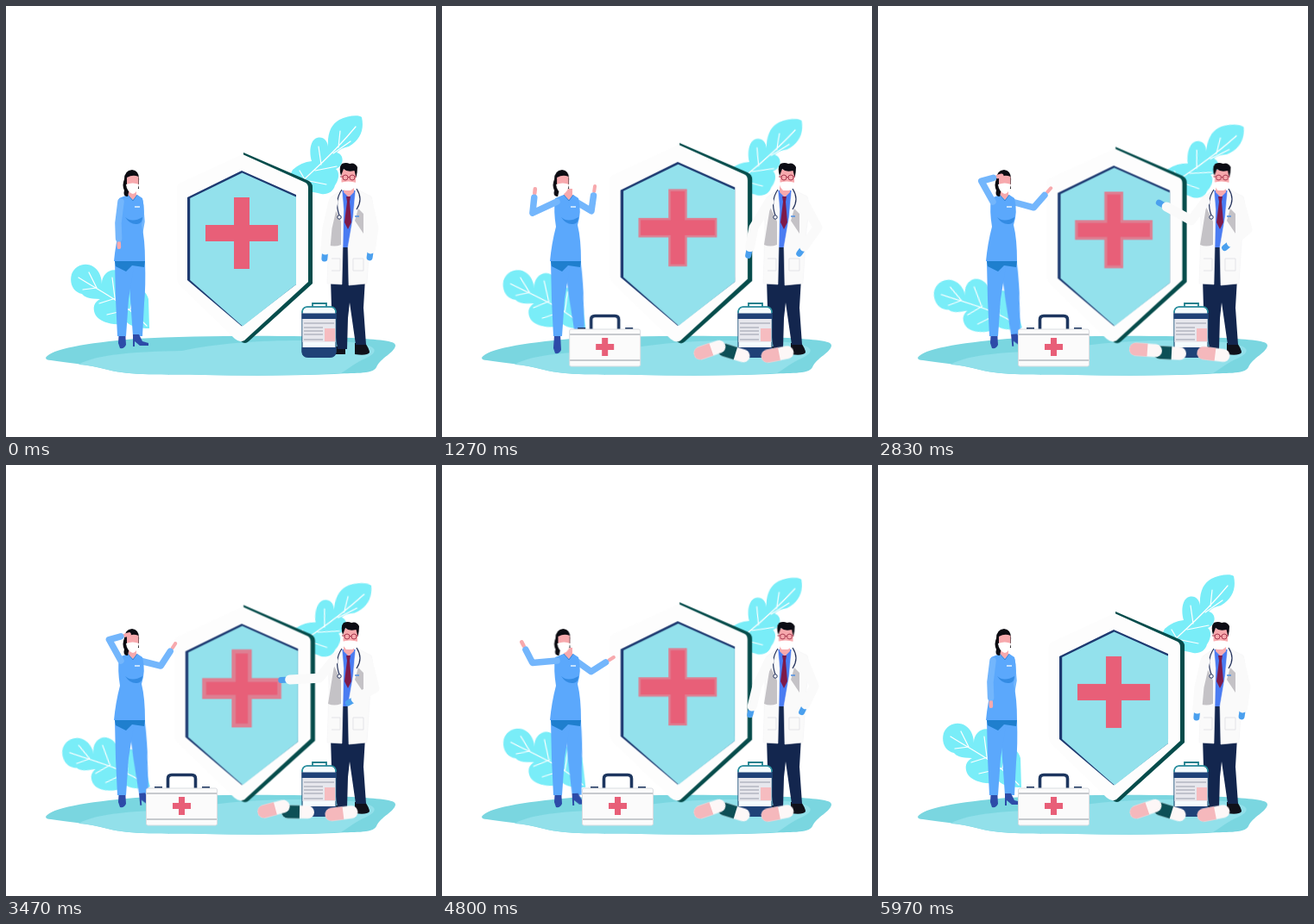
Animation, 498 px wide and 500 px high, one loop 6010 ms. Source, as an HTML page:

```html
<!DOCTYPE html>
<html lang="en">
<head>
<meta charset="utf-8">
<title>Medical protection</title>
<style>
html, body { margin: 0; width: 100%; height: 100%; overflow: hidden; background: #fff; }
svg { display: block; width: 498px; height: 500px; }
.a { animation: 6.01s linear infinite; transform-box: view-box; }
.leaf { fill: #79edf8; }
.vein { fill: none; stroke: #fff; stroke-width: 1.2; stroke-linecap: round; }
.limb { fill: none; stroke-linejoin: round; stroke-linecap: round; }

#leafR { transform-origin: 338px 214px; animation-name: leafR; }
#leafL { transform-origin: 163px 370px; animation-name: leafL; }
#leafR, #leafL { animation-timing-function: cubic-bezier(.37, 0, .63, 1); }
@keyframes leafR { 50% { transform: rotate(8.5deg); } }
@keyframes leafL { 50% { transform: rotate(-13.5deg); } }

#shield { transform-origin: 273px 385px; animation-name: swell; animation-timing-function: cubic-bezier(.37, 0, .63, 1); }
@keyframes swell {
  0%, 100% { transform: scale(1); }
  25%, 75% { transform: scale(1.055); }
  50% { transform: scale(1.03); }
}
#halo { animation-name: halo; }
@keyframes halo {
  0%, 100% { stroke-width: 0; }
  21%, 71% { stroke-width: 2.4px; }
  37% { stroke-width: 1.8px; }
  57.7% { stroke-width: 4.5px; }
  89.4% { stroke-width: 2.4px; }
}

#nurseHead { animation-name: nurseHead; }
@keyframes nurseHead {
  0%, 37%, 58%, 99.3%, 100% { transform: none; }
  21% { transform: translateX(-7px); }
  71%, 89.4% { transform: translateX(-5.5px); }
}
#docHead { animation-name: docHead; }
@keyframes docHead {
  0%, 99.3%, 100% { transform: none; }
  21% { transform: translateX(3px); }
  37%, 71% { transform: translateX(1px); }
  58%, 89.4% { transform: translateX(2px); }
}
#legR { transform-origin: 150px 300px; animation-name: legR; }
@keyframes legR { 0%, 89%, 100% { transform: none; } 21%, 71% { transform: rotate(-5deg); } }
#shoeL { animation-name: step; }
@keyframes step { 0%, 8%, 34%, 100% { transform: none; } 21% { transform: translate(-1px, 6px); } }

#kit { animation-name: kit; }
@keyframes kit {
  0%, 11% { transform: translateX(-66px); opacity: 0; animation-timing-function: ease-out; }
  15% { transform: translateX(-40px); opacity: 1; }
  21.1% { transform: translateX(-15px); animation-timing-function: ease-out; }
  30%, 100% { transform: none; opacity: 1; }
}
.pill { animation-name: pill; }
@keyframes pill {
  0%, 8% { transform: rotate(var(--r)) scale(0); }
  17%, 26% { transform: rotate(var(--r)) scale(1); }
  37%, 50% { transform: rotate(var(--s)) scale(1); }
  57.7% { transform: rotate(var(--m)) scale(1); }
  71%, 100% { transform: rotate(var(--r)) scale(1); }
}
</style>
</head>
<body>
<svg viewBox="0 0 498 500">
  <path fill="#7ad6e0" d="M46 408C52 398 92 391 150 386C230 382 330 382 400 385C430 387 452 388 451 394C450 402 434 408 429 419C425 428 400 425 380 427C330 429 280 429 230 428C180 427 145 429 118 422C92 415 70 414 52 411Q46 411 46 408Z"/>
  <path fill="#92e0ea" d="M84 416C104 404 150 401 204 400C260 387 350 386 400 390C428 393 434 400 418 408C404 414 398 420 388 426C330 429 280 429 230 428C180 427 145 429 118 422Q100 417 84 416Z"/>

  <g id="leafR" class="a">
    <path class="leaf" d="M322 210L332 190Q342 181 354 180C351 171 352 158 358 154C366 150 372 155 373 163C372 147 377 137 386 132C395 127 409 126 412 129C415 143 411 155 397 163Q387 165 383 170C392 172 392 185 382 189C388 194 384 204 381 208C379 216 372 219 365 218C352 214 345 216 334 218Z"/>
    <path class="vein" d="M332 214C350 195 374 178 405 140M385 164L387 145M379 171L399 157M365 184L362 163M358 191L383 186M346 201L340 191M346 202L371 207"/>
  </g>
  <g id="leafL" class="a">
    <path class="leaf" d="M166 374C155 374 145 372 140 367C129 372 110 368 104 359C100 352 101 344 109 340C96 340 90 337 88 334C78 332 73 322 76 311C81 299 94 297 102 303C109 308 111 316 111 324C110 312 120 304 129 307C138 311 141 320 138 329C148 320 162 328 165 340Z"/>
    <path class="vein" d="M163 371C138 345 116 335 84 315M105 327L96 309M105 327L89 329M126 338L123 315M127 339L108 345M144 352L149 330M143 352L117 358"/>
  </g>

  <g id="shield" class="a">
    <path fill="#064c4b" d="M275 170L350 202.500Q355 205 355 210V322L281 389Q277 393 272 389V300Z"/>
    <path fill="#fdfdfd" d="M274 172L346 204.500Q350 206 350 211V320L276 388Q271 391 265 386L202 325Q198 321 198 316V211Q198 207 202 205Z"/>
    <path fill="#1d3970" d="M273 191L336 219V323L273 371.500L210 318V222Z"/>
    <path fill="#93e1ec" d="M273.500 193.500L336 221.500V323L274 371.500L213.200 318V223Z"/>
    <path id="halo" class="a" fill="#e85f78" stroke="#de7f92" stroke-width="0" d="M264 222H282V254H315V273H282V305H264V273H231V254H264Z"/>
  </g>

  <g id="doctor">
    <path fill="#10111a" d="M404 391H416Q421 398 421 402Q418 406 404 404ZM382 395H393V404H380Z"/>
    <path fill="#13264e" d="M376 316H416L414 350L417 393H405L398 344L396 362L395 398H384L377 350Z"/>
    <path fill="#13264e" d="M388 270H398V322H388Z"/>
    <path fill="#4a7cf2" d="M388 214H406L402 280H388Z"/>
    <path fill="#f7a9ad" d="M391 205H403V216L397 222L391 216Z"/>
    <path fill="#7d1a49" d="M394 221H399L398 227L400 251L396 259L392 251L395 227Z"/>
    <path fill="#fafafa" stroke="#f3f3f5" stroke-width=".6" d="M389 213L376 222Q373 230 374 260L372 322L389 323L390 280L391 236Z"/>
    <path fill="#fafafa" stroke="#f3f3f5" stroke-width=".6" d="M405 212L423 221Q427 230 422 260L418 322L397 324L396 280L402 245Z"/>
    <path fill="#c4c2c6" d="M380 233L388 250V277Q380 280 373 277ZM408 235L414 241V264L404 249Z"/>
    <path fill="none" stroke="#e3e3e7" d="M377 293H387V307H377M402 293H414V307H402Z"/>
    <path fill="none" stroke="#24325c" stroke-width="1.200" d="M389 213Q380 226 386 243M406 212Q414 224 406 236"/>
    <circle cx="386" cy="245" r="2.200" fill="#fff" stroke="#24325c"/>
    <path stroke="#4e8fe2" stroke-width="1.500" d="M404 244H409"/>
    <g id="docHead" class="a">
      <path fill="#f7a9ad" d="M388.500 190H405V206L399 212H391L388.500 204Z"/>
      <path fill="#0c0c14" d="M388 197Q385 187 389 183Q394 181 398 183Q404 181 407 187Q407 193 405.500 199L403.500 191Q395 193 391 189Z"/>
      <path fill="#fff" d="M387 205Q396 202 406 205Q405 211 399 214H392Q388 210 387 205Z"/>
      <path fill="none" stroke="#a83a50" d="M387 198H390M396 198.500H398M404 198H406"/>
      <circle cx="393" cy="199" r="3" fill="none" stroke="#a83a50"/>
      <circle cx="401" cy="199" r="3" fill="none" stroke="#a83a50"/>
    </g>
    <path class="limb" stroke="#4ba0ee" stroke-width="7" id="docRHand"/>
    <path class="limb" stroke="#fafafa" stroke-width="11" id="docR"/>
    <path class="limb" stroke="#4ba0ee" stroke-width="7" id="docLHand"/>
    <path class="limb" stroke="#fafafa" stroke-width="11" id="docL"/>
  </g>

  <g id="nurse">
    <path class="limb" stroke="#f7a9ad" stroke-width="4" id="nurseRHand"/>
    <path class="limb" stroke="#73b6fc" stroke-width="7.500" id="nurseR"/>
    <g id="legR" class="a">
      <path fill="#5ba8fc" d="M142 296H161Q162 325 160 345L158 383H147L144 340Z"/>
      <path fill="#2d4ba8" d="M147 381H154L158 389L165 391V394H155L149 389V395H147Z"/>
    </g>
    <path id="shoeL" class="a" fill="#2d4ba8" d="M131 376H138L139 393Q137 398 132 397L130 391Z"/>
    <path fill="#5ba8fc" d="M126 296H149L142 340L139 383H129L127 340Z"/>
    <path fill="#1f7fce" d="M126 296H161L160 303L146 301L139 308L127 302Z"/>
    <path fill="#f7a9ad" d="M142 212H151V221L147 226L141 221Z"/>
    <path fill="#5ba8fc" d="M131 223L141 219L147 225L152 219L158 223Q162 239 157 254Q161 270 161 296H125Q127 275 132 256Q129 238 131 223Z"/>
    <path fill="#338be3" d="M138 245Q146 252 158 245Q158 252 152 253Q144 254 138 245Z"/>
    <path fill="none" stroke="#317fd0" stroke-width=".8" d="M141 219L147 226L152 219"/>
    <path stroke="#e6f4ff" stroke-width="1.500" d="M149 233H155"/>
    <g id="nurseHead" class="a">
      <path fill="#0c0c12" d="M141 221Q135 221 137 214Q134 208 137 201Q137 191 146 190Q155 191 154 203V212H143Z"/>
      <path fill="#f7a9ad" d="M140 199Q147 195 153.500 198V209H140Z"/>
      <path fill="#fff" d="M139 207Q147 204 154 207Q153 216 147 218Q140 216 139 207Z"/>
    </g>
    <path class="limb" stroke="#f7a9ad" stroke-width="4.500" id="nurseLHand"/>
    <path class="limb" stroke="#73b6fc" stroke-width="7.500" id="nurseL"/>
  </g>

  <g id="bottle">
    <path fill="none" stroke="#1f7f8c" stroke-width="1.800" d="M355 349V345H371V349"/>
    <rect x="343" y="349" width="39" height="58" rx="6" fill="#f4fbfd" stroke="#21527a" stroke-width="1.200"/>
    <path fill="none" stroke="#2a93a0" stroke-width="1.500" d="M343 356Q343 349 349 349H376Q382 349 382 356"/>
    <path fill="#1f4277" d="M342.500 356.500H382.500V363H342.500ZM342.500 396H382.500V401Q382 408 375 408H350Q343 408 342.500 401Z"/>
    <rect x="343.500" y="363" width="38" height="27" fill="#e7e7ed"/>
    <path stroke="#b4b6c2" stroke-width="1.300" d="M345 368H380M345 373H367M345 377H367M345 381H367M345 387H367"/>
    <rect x="369" y="374" width="12" height="15" fill="#f6bcc0"/>
  </g>

  <g id="pills"></g>

  <g id="kit" class="a">
    <path fill="none" stroke="#1d365f" stroke-width="3.600" d="M187.500 377V364Q187.500 359.500 192 359.500H215Q219.500 359.500 219.500 364V377"/>
    <path fill="#1d365f" d="M172 373H181V377H172ZM227 373H236V377H227Z"/>
    <rect x="162.500" y="375" width="82" height="43" rx="2" fill="#fbfbfb" stroke="#d9dce0"/>
    <path stroke="#c7cace" stroke-width="2" d="M163 381H244M163 411H244"/>
    <path fill="#e85f78" d="M200 385H207V392H214V399H207V406H200V399H193V392H200Z"/>
  </g>
</svg>
<script>
const LOOP = 6010;
const TIMES = [0, 1270, 2230, 3470, 4270, 5370, 5970];

// Each pose: upper angle, upper length, forearm angle, forearm length.
const arms = {
  nurseL: { x: 133, y: 227, hand: 5, poses: [[97, 25, 88, 28], [155, 31, 276, 28], [241, 27, 344, 25], [241, 28, 345, 24], [211, 29, 314, 28], [132, 27, 148, 26]] },
  nurseR: { x: 155, y: 227, hand: 6, poses: [[85, 23, 100, 22], [31, 21, -82, 29], [17, 27, -41, 29], [14, 25, -57, 31], [20, 24, -46, 30], [60, 20, -7, 32]] },
  docL: { x: 379, y: 227, hand: 5, poses: [[103, 31, 95, 36], [121, 35, 101, 33], [124, 29, 224, 40], [129, 26, 177, 44], [126, 32, 128, 38], [105, 31, 90, 34]] },
  docR: { x: 419, y: 227, hand: 5, poses: [[77, 31, 98, 35], [62, 34, 125, 37], [71, 34, 130, 33], [76, 33, 151, 35], [65, 33, 123, 33], [73, 31, 109, 34]] }
};

const pills = [
  { x: 338, y: 402.5, r: 17, s: 3, m: 1, color: '#0d4f56' },
  { x: 310, y: 399, r: -19, s: 4, m: -15, color: '#f5b8bc' },
  { x: 388.5, y: 404, r: -11, s: 7, m: -7, color: '#f5b8bc' }
];
document.getElementById('pills').innerHTML = pills.map(p => `
  <g transform="translate(${p.x} ${p.y})">
    <g class="pill a" style="--r:${p.r}deg;--s:${p.s}deg;--m:${p.m}deg">
      <rect x="-19" y="-7.5" width="38" height="15" rx="7.5" fill="#fdf7f7"/>
      <path d="M2-7.5H-11.500A7.5 7.5 0 0 0-11.500 7.5H2Z" fill="${p.color}"/>
    </g>
  </g>`).join('');

// Smooth curve through the key values without overshoot.
function curve(values, t) {
  const last = TIMES.length - 1;
  if (t >= TIMES[last]) return values[last];
  const slope = i => (values[i + 1] - values[i]) / (TIMES[i + 1] - TIMES[i]);
  const tangent = i => {
    if (i === 0 || i === last) return 0;
    const a = slope(i - 1), b = slope(i);
    return a * b > 0 ? 2 * a * b / (a + b) : 0;
  };
  let i = 0;
  while (t >= TIMES[i + 1]) i++;
  const span = TIMES[i + 1] - TIMES[i], u = (t - TIMES[i]) / span;
  const w = u * u * (3 - 2 * u);
  return values[i] * (1 - w) + values[i + 1] * w
    + span * u * (1 - u) * (tangent(i) * (1 - u) - tangent(i + 1) * u);
}

function reach([x, y], angle, length) {
  const a = angle * Math.PI / 180;
  return [x + Math.cos(a) * length, y + Math.sin(a) * length];
}

const line = (...points) => 'M' + points.map(p => p.map(v => v.toFixed(2))).join('L');

for (const [id, arm] of Object.entries(arms)) {
  arm.sleeve = document.getElementById(id);
  arm.glove = document.getElementById(id + 'Hand');
  arm.tracks = [0, 1, 2, 3].map(k => [...arm.poses, arm.poses[0]].map(p => p[k]));
}

function draw(t) {
  for (const arm of Object.values(arms)) {
    const [upper, upperLen, fore, foreLen] = arm.tracks.map(v => curve(v, t));
    const shoulder = [arm.x, arm.y];
    const elbow = reach(shoulder, upper, upperLen);
    const wrist = reach(elbow, fore, foreLen - arm.hand - 5);
    const palm = reach(elbow, fore, foreLen - arm.hand);
    const tip = reach(elbow, fore, foreLen);
    arm.sleeve.setAttribute('d', line(shoulder, elbow, wrist));
    arm.glove.setAttribute('d', line(palm, tip));
  }
}

let start;
function frame(now) {
  start ??= now;
  draw((now - start) % LOOP);
  requestAnimationFrame(frame);
}
draw(0);
requestAnimationFrame(frame);
</script>
</body>
</html>
```
